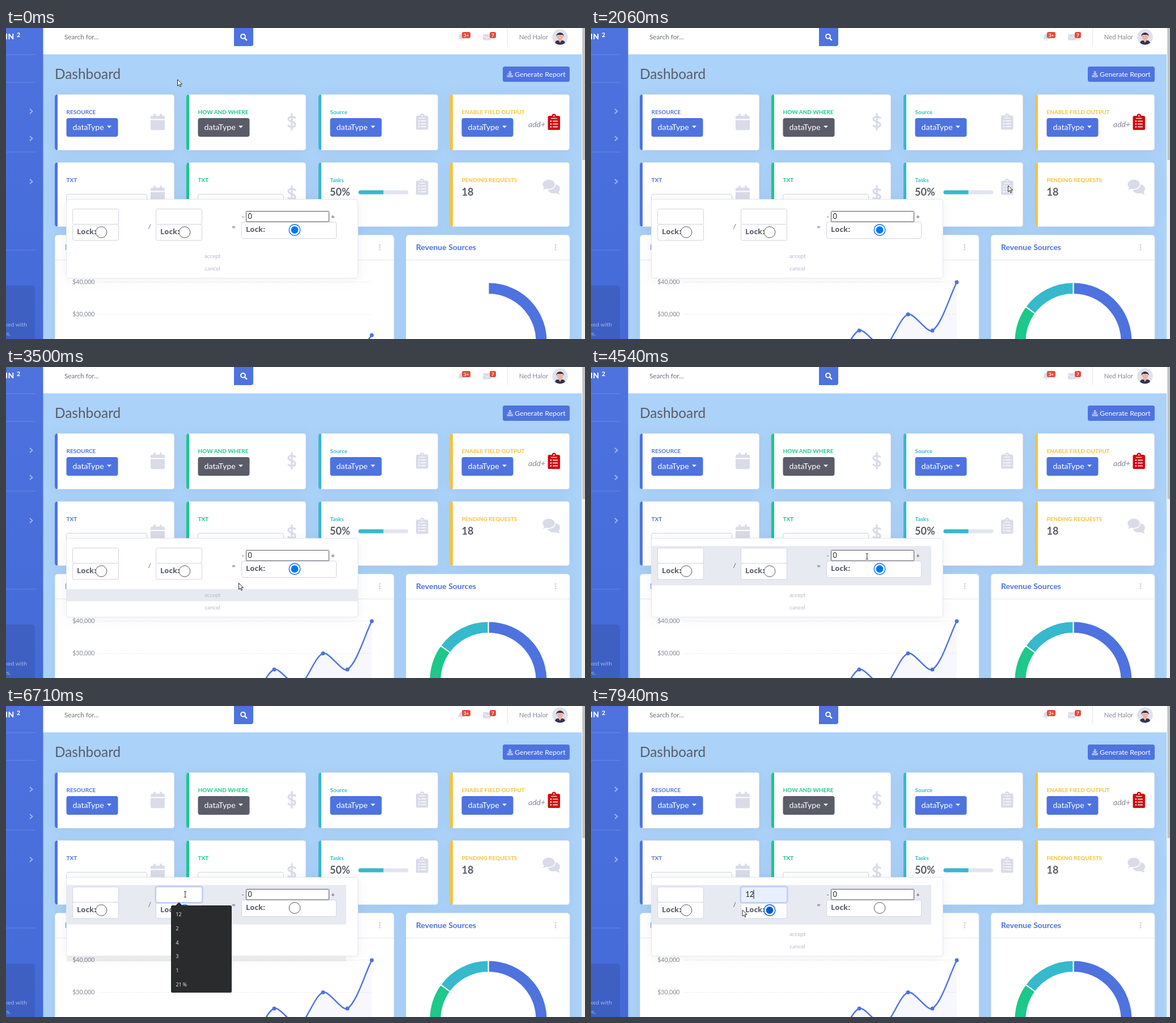
Write an HTML page that moves like this. It is 1021 by 549 pixels and loops after 8000 ms.

```html
<!DOCTYPE html>
<html lang="en">
<head>
<meta charset="utf-8">
<title>Dashboard</title>
<style>
html, body { margin: 0; width: 100%; height: 100%; overflow: hidden; background: #abd2f9 }
svg { display: block; font-family: Lato, "Open Sans", sans-serif }
.shade { filter: drop-shadow(0 2px 10px rgba(58, 59, 69, .07)) }
</style>
</head>
<body>
<svg width="1021" height="549" viewBox="0 0 1021 549">
  <defs>
    <linearGradient id="side" x2="0" y2="1"><stop stop-color="#4e73df"/><stop offset="1" stop-color="#446ad8"/></linearGradient>
    <clipPath id="face"><circle cx="977" cy="16" r="13.5"/></clipPath>
  </defs>
  <g id="page"></g>
  <g id="charts"></g>
  <g id="popup"></g>
  <g id="pointer"></g>
</svg>
<script>
const BLUE = '#4e73df', GREEN = '#1cc88a', TEAL = '#36b9cc', YELLOW = '#f6c23e';
const DARK = '#5a5c69', GREY = '#858796', PALE = '#d9dbe8', LINE = '#e3e6f0', FIELD = '#d1d3e2', HOVER = '#e8eaf2';
const $ = id => document.getElementById(id);

const rect = (x, y, w, h, fill, r = 0, stroke = 'none', sw = 1) =>
  `<rect x="${x}" y="${y}" width="${w}" height="${h}" rx="${r}" fill="${fill}" stroke="${stroke}" stroke-width="${sw}"/>`;
const text = (x, y, s, size, fill, weight = 400, more = '') =>
  `<text x="${x}" y="${y}" font-size="${size}" fill="${fill}" font-weight="${weight}" ${more}>${s}</text>`;
const path = (d, fill, stroke = 'none', sw = 1, more = '') =>
  `<path d="${d}" fill="${fill}" stroke="${stroke}" stroke-width="${sw}" ${more}/>`;
const circle = (x, y, r, fill, stroke = 'none', sw = 1) =>
  `<circle cx="${x}" cy="${y}" r="${r}" fill="${fill}" stroke="${stroke}" stroke-width="${sw}"/>`;
const at = (x, y, s) => `<g transform="translate(${x} ${y})">${s}</g>`;
const ROUND = 'stroke-linecap="round" stroke-linejoin="round"';
const END = 'text-anchor="end"', MID = 'text-anchor="middle"';

// Icons, drawn from their top left corner
const calendar = path('M0 11.5h25v15a2.8 2.8 0 0 1-2.8 2.8h-19.4a2.8 2.8 0 0 1-2.8-2.8zM0 9.5v-3a2.8 2.8 0 0 1 2.8-2.8h2.4v-3.2h3.6v3.2h7.4v-3.2h3.6v3.2h2.4a2.8 2.8 0 0 1 2.8 2.8v3z', PALE);
const dollar = path('M8 1v28M14 8C10 5.5 2 5 2 10.300C2 16 14 14 14 20C14 25.500 6 25 2 22', 'none', PALE, 3.2, ROUND);
const clipboard = c => rect(0, 3.6, 21.5, 25, c, 2.6) + circle(10.7, 3.8, 3.7, c) + circle(10.7, 3.8, 1.2, '#fff') +
  path('M5.500 8h10.500', 'none', '#fff', 1.2) +
  [13, 18, 23].map(y => circle(5.3, y, 1.3, '#fff') + path(`M8.500 ${y}h9`, 'none', '#fff', 1.5)).join('');
const comments = path('M20 8.500c7 0 11.500 3.500 11.500 8 0 2.500-1 4-2.500 5.500 0 2 1.500 3.300 2.500 4.500-3 .2-5-.5-7-2-7 1.500-13-1-14.500-5.500z', PALE) +
  path('M11.500 0C18 0 23 4 23 9s-5 9-11.500 9c-1.500 0-3-.2-4.500-.7-2 1.500-4.500 2.200-7 2.200 1-1.200 2.300-3 2.500-4.800C1 13 0 11 0 9 0 4 5 0 11.500 0z', PALE, '#fff', 1.4);

function card(x, y, h, color, title) {
  return rect(x, y, 30, h, color, 5) +
    path(`M${x + 4} ${y + .5}h202.500q4 0 4 4v${h - 9}q0 4-4 4h-202.500z`, '#fff', LINE) +
    rect(x + 3, y + 1, 2, h - 2, color) + text(x + 20.5, y + 35, title, 10, color, 700);
}
const typeButton = (x, fill) => rect(x, 159, 91, 33, fill, 4) + text(x + 11, 179.5, 'dataType', 14.2, '#fff') +
  path(`M${x + 71.5} 172.500h8l-4 4z`, '#fff');
const panel = (x, w, title) => rect(x + .5, 365.5, w - 1, 230, '#fff', 5, LINE) + rect(x + 1, 409, w - 2, 1, LINE) +
  text(x + 18, 391.5, title, 14, BLUE, 700) + [383, 387, 391].map(y => circle(x + w - 25.5, y, 1.5, FIELD)).join('');
const badge = (x, w, s) => rect(x, 7, w, 11, '#e74a3b', 3) + text(x + w / 2, 15.6, s, 8.3, '#fff', 700, MID);

function drawPage() {
  const X = [86, 318, 551, 783];
  let s = rect(65, 46, 950, 503, '#abd2f9') + rect(65, 0, 950, 46.5, '#fff');

  s += rect(0, 0, 65.5, 549, 'url(#side)') + text(15, 20, 'IN', 13.8, '#fff', 800, END + ' letter-spacing=".7"') +
    text(19, 15.5, '2', 10.5, '#fff', 800);
  for (const y of [47, 96, 219, 392]) s += rect(0, y - .5, 52, 1, 'rgba(255,255,255,.17)');
  for (const y of [147, 195, 271]) s += path(`M42 ${y - 4.2}l4.500 4.200-4.500 4.200`, 'none', '#a9b9ef', 1.8);
  s += rect(-10, 454.5, 61, 110, 'rgba(0,0,0,.1)', 5) +
    text(37, 527, 'packed with', 10.4, '#a4b6ec', 400, END) + text(8, 543, 'features,', 10.4, '#a4b6ec', 400, END);

  s += text(103, 20, 'Search for...', 11.8, '#6e707e') + path('M402 0h34v28q0 4-4 4h-30z', BLUE) +
    circle(418, 14.8, 3.9, 'none', '#fff', 2) + path('M421 18l3.200 3.200', 'none', '#fff', 2.4, ROUND);
  s += path('M797 19.500c2-2 1.500-4 2-6 1-4 7-4 8 0 .5 2 0 4 2 6zM801.500 20.500h3.500a1.700 1.700 0 0 1-3.500 0z', PALE) + badge(804, 15, '3+') +
    rect(841, 11, 14, 10.5, PALE, 1.5) + path('M841 13.500l7 4.500 7-4.500', 'none', '#fff', 1) + badge(853, 11, '7') +
    rect(884, 0, 1, 32, LINE) + text(956, 20, 'Ned Halor', 11.4, GREY, 400, END);
  s += circle(977, 16, 13.8, '#dfe1eb') + `<g clip-path="url(#face)">` + rect(968, 22, 18, 12, '#33344f', 5) +
    path('M973 20h8l-4 6z', '#f0b3a6') + circle(977, 15.5, 5.3, '#f0b3a6') + path('M970.500 15c-1-9 14-9 13 0l-2-3h-9z', '#2f2e41') + '</g>';

  s += text(86, 90, 'Dashboard', 24.4, DARK) + rect(876, 68, 118, 27, BLUE, 3.5) + text(897, 85.5, 'Generate Report', 12.3, '#fff') +
    path('M887 76h3.500v4h3l-4.700 4.500-4.800-4.500h3zM883.500 83h3l2.300 2 2.300-2h3v4h-10.600z', '#a7b9ef');

  s += '<g class="shade">' + card(X[0], 117, 99, BLUE, 'RESOURCE') + card(X[1], 117, 99, GREEN, 'HOW AND WHERE') +
    card(X[2], 117, 99, TEAL, 'Source') + card(X[3], 117, 99, YELLOW, 'ENABLE FIELD OUTPUT') +
    card(X[0], 237, 114, BLUE, 'TXT') + card(X[1], 237, 114, GREEN, 'TXT') +
    card(X[2], 237, 114, TEAL, 'Tasks') + card(X[3], 237, 114, YELLOW, 'PENDING REQUESTS') +
    panel(86, 598.5, 'Earnings Overview') + panel(705, 289.5, 'Revenue Sources') + '</g>';
  X.forEach((x, i) => s += typeButton(x + 20.5, i === 1 ? DARK : BLUE));
  s += at(255, 151, calendar) + at(255, 278, calendar) + at(496, 150.5, dollar) + at(496, 278, dollar) +
    at(723, 151, clipboard(PALE)) + at(723, 266, clipboard(PALE)) + at(955.5, 151.5, clipboard('#d10a11')) + at(945.5, 267, comments) +
    text(921, 175, 'add+', 14, GREY, 400, 'font-style="italic"');
  s += rect(106.5, 293.5, 142, 26, '#fff', 3, FIELD) + rect(338.5, 293.5, 151, 26, '#fff', 3, FIELD) +
    text(571, 295.5, '50%', 18, DARK, 700) + text(803.5, 295.5, '18', 18, DARK, 700) +
    rect(621.5, 286.5, 88, 7, '#e2e5f0', 3.5) + path('M625 286.500h40.500v7h-40.500a3.500 3.500 0 0 1 0-7z', TEAL);
  [['$40,000', 448], ['$30,000', 505]].forEach(([label, y]) =>
    s += text(156.5, y + 4, label, 10.6, GREY, 400, END) + path(`M165 ${y + .5}H645`, 'none', '#e6e8f1', 1, 'stroke-dasharray="2"'));

  s += rect(1015, 0, 6, 549, '#f1f1f1') + rect(1016.5, 0, 4.5, 233, '#c1c1c1');
  $('page').innerHTML = s;
}

const earnings = [0, 10, 5, 15, 10, 20, 15, 25, 20, 30, 25, 40];

function lineChart(grow) {
  const base = 676, pts = earnings.map((v, i) => [172 + 43 * i, base - 5.68 * v * grow]);
  const ctrl = pts.map((c, i) => {
    const a = pts[i - 1] || c, b = pts[i + 1] || c;
    const da = Math.hypot(c[0] - a[0], c[1] - a[1]), db = Math.hypot(b[0] - c[0], b[1] - c[1]);
    const move = k => [c[0] + k * (b[0] - a[0]), c[1] + k * (b[1] - a[1])];
    return [move(-.3 * da / (da + db)), move(.3 * db / (da + db))];
  });
  let d = 'M' + pts[0];
  for (let i = 1; i < pts.length; i++) d += `C${ctrl[i - 1][1]} ${ctrl[i][0]} ${pts[i]}`;
  return path(`${d}V${base}H172z`, 'rgba(78,115,223,.05)') + path(d, 'none', BLUE, 2.5) +
    pts.map(p => circle(...p, 3.5, BLUE)).join('');
}

function donut(grow) {
  const polar = (r, a) => [850.5 + r * Math.sin(a), 553 - r * Math.cos(a)];
  let from = 0;
  return [[.55, BLUE], [.3, GREEN], [.15, TEAL]].map(([share, color]) => {
    const to = from + share * grow * 2 * Math.PI, big = to - from > Math.PI ? 1 : 0;
    const d = `M${polar(104, from)}A104 104 0 ${big} 1 ${polar(104, to)}L${polar(83, to)}A83 83 0 ${big} 0 ${polar(83, from)}z`;
    from = to;
    return path(d, color, '#fff', 2);
  }).join('');
}

function drawCharts(t) {
  const p = Math.min(1, (t + 198) / 1000), grow = 1 - (1 - p) ** 4;
  $('charts').innerHTML = lineChart(grow) + donut(grow);
}

const within = (t, a, b) => t >= a && t < b;

function hovered(t) {
  const changes = [[0, ''], [2390, 'row'], [2470, 'accept'], [2640, 'cancel'], [3440, 'accept'], [3560, 'row'], [7210, ''], [7700, 'row']];
  return changes.filter(c => c[0] <= t).pop()[1];
}

function radio(x, y, on, color = '#0075ff') {
  return circle(x, y, 9.8, '#fff', on ? color : '#555', on ? 1.4 : 1) + (on ? circle(x, y, 6.4, color) : '');
}
const lock = (x, y, w, h) => rect(x, y, w, h, '#fff', 3, FIELD) +
  text(x + 7.5, y + 17.5, 'Lock:', 13, DARK, 700, 'font-family="Open Sans, sans-serif"');

function suggestions(active) {
  let s = path('M298 353l7-6.500 7 6.500z', '#2a2b2d') + rect(291, 352, 107, 154, '#2a2b2d', 2.5);
  if (active) s += rect(291, 356, 107, 24, '#4a4b50');
  ['12', '2', '4', '3', '1', '21 %'].forEach((v, i) =>
    s += text(299.5, 371.2 + 24.7 * i, v, 8.8, '#f4f4f4', 400, 'font-family="Open Sans, sans-serif"'));
  return s;
}

function drawPopup(t) {
  const box = $('popup');
  if (within(t, 1260, 1920)) return box.innerHTML = '';
  const hover = hovered(t), pressed = within(t, 5500, 5620) || within(t, 6220, 6340);
  const ink = pressed ? '#fff' : '#555763', focus = t >= 6220, filled = t >= 7700, listOpen = within(t, 6340, 7700);
  const second = t >= 5620, pointed = within(t, 5620, 5920) || t >= 7820;

  let s = '<g class="shade">' + rect(106.5, 302.5, 514, 139, '#fff', 4, LINE) + '</g>';
  if (pressed || hover === 'row') s += rect(107, 316, 493, 69.5, pressed ? BLUE : HOVER);
  if (hover === 'accept') s += rect(107, 392, 514, 21.5, HOVER);
  if (hover === 'cancel') s += rect(107, 413.5, 514, 21, HOVER);

  s += lock(117.5, 346.5, 81, 28.5) + rect(117.5, 319.5, 81, 27, '#fff', 3, FIELD) + radio(168, 360.5, false);
  s += lock(264.5, 346.5, 81, 28.5) + radio(315, 360.5, second, pointed ? '#005cc8' : '#0075ff');
  if (focus) s += rect(263.5, 318.5, 83, 29, 'none', 4, '#c9d4f6', 3);
  s += rect(264.5, 319.5, 81, 27, filled ? '#e8f0fe' : '#fff', 3, focus ? '#bac8f3' : FIELD);
  if (filled) s += text(272.5, 337, '12', 12.6, '#222');
  if (within(t, 6340, 6710) || t >= 7210) s += rect(filled ? 286.5 : 272, 324.5, 1, 16, '#222');

  s += text(250.5, 355, '/', 12, ink) + text(398, 355, '=', 12, ink) + text(415.5, 336.5, '-', 12, ink) +
    text(573, 337, '+', 12, pressed ? '#fff' : '#7d3b46');
  s += lock(415.5, 342.5, 167, 29) + radio(509, 356.5, !second) +
    rect(423.5, 323.5, 146, 18.5, '#fff', 1, pressed ? '#dfe3f3' : '#55565c') + text(426.5, 337, '0', 12.6, '#222');

  if (listOpen) s += rect(107, 442, 493, 9, 'rgba(60,60,70,.07)') + suggestions(t >= 7270);
  else s += text(364, 406, 'accept', 10, '#b7b9cc', 400, MID) + text(364, 427.5, 'cancel', 10, '#b7b9cc', 400, MID);

  const p = t < 1260 ? 1 : Math.min(1, (t - 1920) / 140), k = 1 - .1 * (1 - p) ** 3;
  box.innerHTML = `<g opacity="${1 - (1 - p) ** 4}" transform="translate(364 372) scale(${k}) translate(-364 -372)">${s}</g>`;
}

// time, x, y
const route = [[0, 302.5, 91], [820, 735.5, 278], [2200, 735.5, 278], [2530, 470, 409], [2700, 408, 428], [2880, 402, 422],
  [3400, 402, 422], [3500, 410.5, 381.5], [3670, 490, 333], [4500, 490, 333], [4860, 400, 372], [5190, 315.5, 362],
  [5820, 315.5, 362], [6040, 316, 332.5], [7170, 316, 332.5], [7270, 306, 364], [7660, 306, 364], [7920, 267, 360], [8000, 267, 360]];

const arrow = path('M0 0v11.300l2.600-2.400 1.700 3.800 1.800-.8-1.700-3.700h3.600z', '#fff', '#111', .9);
const hand = path('M-1.300 1.200c0-1.700 2.600-1.700 2.600 0v4.800c.7-1 2.300-.8 2.500.3.700-.8 2.100-.5 2.200.6.900-.6 2-.1 2 1.100v3c0 2.500-1.500 3-1.500 5h-6.300c-.5-2.300-3.700-4.700-4.700-6.800-.5-1.500 1.300-2.200 2.200-.9l1 1.200z', '#fff', '#111', .9);
const beam = path('M-2-5h1.500l.5.500.5-.5h1.500M-2 5h1.500l.5-.5.500.500h1.500M0-4.500v9', 'none', '#222', 1);

function drawPointer(t) {
  const i = route.findIndex(k => k[0] > t), [t0, x0, y0] = route[i - 1], [t1, x1, y1] = route[i];
  const p = (t - t0) / (t1 - t0), e = p * p * (3 - 2 * p);
  const shape = within(t, 2470, 3480) ? hand : within(t, 3620, 4560) || within(t, 5960, 7200) ? beam : arrow;
  $('pointer').innerHTML = at(x0 + (x1 - x0) * e, y0 + (y1 - y0) * e, shape);
}

drawPage();
const start = performance.now();
function frame() {
  const t = (performance.now() - start) % 8000;
  drawCharts(t);
  drawPopup(t);
  drawPointer(t);
  requestAnimationFrame(frame);
}
frame();
</script>
</body>
</html>
```
